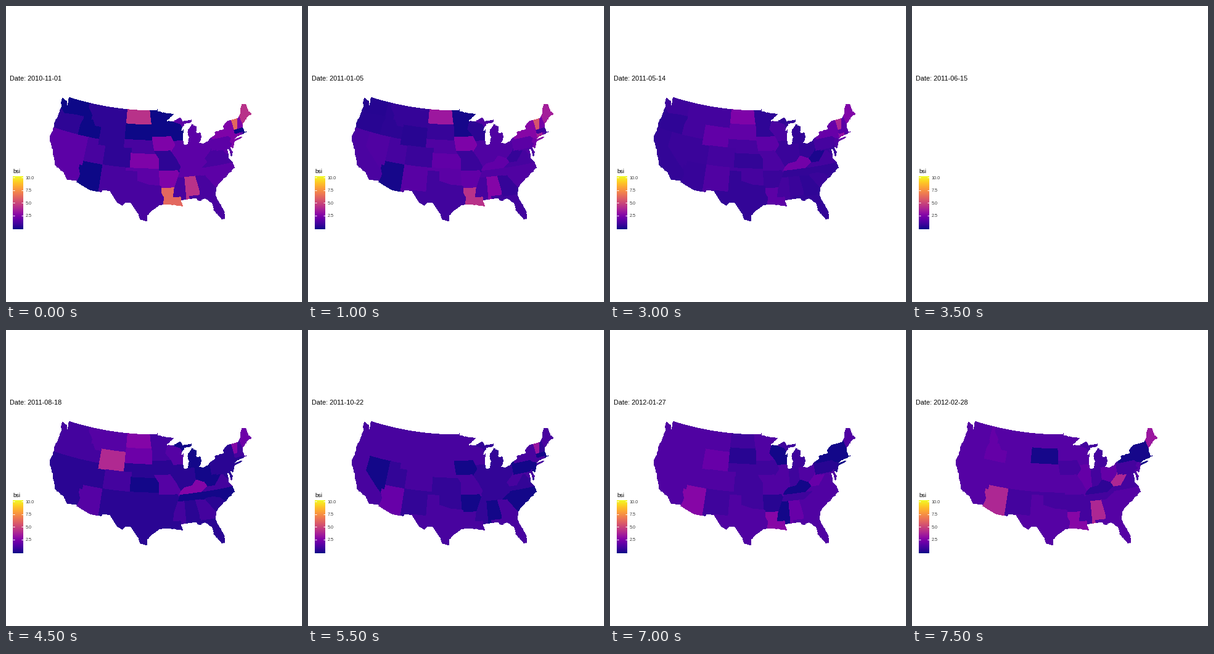
A matplotlib script for the animation above (8000 ms loop, 480 by 480 pixels).

```python
import random

import matplotlib.pyplot as plt
import numpy as np
from matplotlib.animation import FuncAnimation
from matplotlib.patches import PathPatch, Polygon
from matplotlib.path import Path

SIZE, DPI = 480, 72
FRAMES, INTERVAL = 16, 500
EMPTY = 7                                # step without data
START, SPAN = np.datetime64("2010-11-01"), 484
TOP = 10.3                               # value at the bright end of the scale

# Step: (common level, {other level: states}); steps between are blended.
LEVELS = {
    0: (1.7, {0: "WA ID AZ SD MN WI MA", .6: "OR MT WY CO MO",
              1.2: "UT NM NE TX MS GA FL VA WV", 2.6: "KS IA AR NJ NY CT NH",
              4.4: "ND AL ME", 6.3: "LA VT"}),
    4: (1.1, {.3: "OR WY AZ MN GA WV", .85: "WA CA MT TX FL",
              1.6: "SD OK NE PA", 2: "NM KY NJ MA NH RI", 2.5: "ND IA LA",
              3: "NY ME", 4.9: "VT CT"}),
    9: (.5, {.1: "MI OH WV NC TN KS", 1.1: "WA OR ID CO MN MS VA GA NH MA",
             1.5: "AZ MO MT WI", 2.1: "SD ME", 2.7: "ND KY VT", 4.1: "WY"}),
    11: (1.2, {.1: "NV IA AR AL SC NC NJ PA MA",
               .7: "UT NM KS OK IL MI IN OH KY TN MS VA NH",
               2: "AZ", 3.3: "VT"}),
    14: (1.4, {.1: "MS KY WI NY VT NH MA CT RI", .45: "SD AR PA NJ",
               1: "NM ND KS OK IA IN MI TN NE", 2: "WY AL WV", 2.8: "AZ LA"}),
    15: (1.5, {.15: "SD NY VT NH MA CT RI", .6: "KY",
               1.1: "NM OK IA AR IN MI TN MS MD VA PA", 1.9: "ID IL OH",
               2.8: "LA", 3.4: "ME", 4: "AZ AL WV"}),
}

plt.rcParams["font.family"] = "Liberation Sans"
plasma = plt.get_cmap("plasma")
rng = random.Random(5)

fig = plt.figure(figsize=(SIZE / DPI, SIZE / DPI), dpi=DPI, facecolor="white")
ax = fig.add_axes([0, 0, 1, 1])
ax.set_axis_off()

# ---- projection: Albers conic, parallels 39 and 45 ----
S1, S2 = np.sin(np.radians([39, 45]))
N = (S1 + S2) / 2
C = 1 - S1 ** 2 + 2 * N * S1
SCALE = 455.3


def rho(lat):
    return np.sqrt(C - 2 * N * np.sin(np.radians(lat))) / N


def project(pts):
    """Degrees west and north to stage pixels."""
    lon, lat = np.asarray(pts, float).T
    a, r = N * np.radians(95.84 - lon), rho(lat)
    return np.column_stack([240.6 + SCALE * r * np.sin(a),
                            168.8 + SCALE * (r * np.cos(a) - rho(49))])


def dense(pts):
    """Split long edges so that parallels come out curved."""
    out = []
    for (x0, y0), (x1, y1) in zip(pts, pts[1:]):
        n = int(np.hypot(x1 - x0, y1 - y0) / 0.8) + 1
        out += [(x0 + (x1 - x0) * i / n, y0 + (y1 - y0) * i / n) for i in range(n)]
    return out + [pts[-1]]


def rough(pts, levels=4, amount=0.17):
    """Midpoint displacement for ragged shores."""
    for _ in range(levels):
        out = []
        for (x0, y0), (x1, y1) in zip(pts, pts[1:]):
            dx, dy = x1 - x0, y1 - y0
            k = rng.uniform(-amount, amount) * min(1, 0.6 / np.hypot(dx, dy))
            out += [(x0, y0), ((x0 + x1) / 2 - k * dy, (y0 + y1) / 2 + k * dx)]
        pts = out + [pts[-1]]
    return pts


# ---- outline of the country, key points only ----
pacific = [
    (122.8, 49), (122.4, 47.3), (122.7, 48.1), (124.7, 48.4), (124, 46.3),
    (124.1, 44.3), (124.5, 42.9), (124.1, 41.5), (124.4, 40.4), (123.7, 38.9),
    (122.5, 37.7), (121.9, 36.5), (120.6, 34.6), (118.4, 33.8), (117.1, 32.5)]
south = [
    (117.1, 32.5), (114.7, 32.7), (114.8, 32.5), (111.1, 31.33), (108.2, 31.33),
    (108.2, 31.8), (106.5, 31.8), (104.5, 29.6), (103.2, 29), (102.5, 29.75),
    (101.4, 29.77), (99.5, 27.5), (99.1, 26.4), (97.15, 25.95)]
gulf = [
    (97.15, 25.95), (97.4, 27.3), (94.7, 29.4), (92.3, 29.55), (90.1, 29.1),
    (89.2, 29), (89.5, 30.2), (86.2, 30.4), (85.3, 29.7), (84.1, 30.1),
    (82.75, 29), (82.6, 27.5), (81.1, 25.2), (80.4, 25.2), (80.05, 26.8),
    (81.4, 30.5)]
atlantic = [
    (81.4, 30.5), (80.9, 32), (79.2, 33.2), (77.95, 33.9), (76.6, 34.7),
    (75.5, 35.25), (76, 36.9), (76.35, 37.3), (76.4, 39.2), (76.15, 39.2),
    (76, 37.15), (75.1, 38.5), (75.5, 39.5), (74.9, 39), (74, 40.3), (73.7, 41),
    (71.4, 41.45), (70, 41.65), (70.1, 42), (70.6, 41.9), (70.8, 42.8),
    (70.2, 43.6), (68.8, 44.4), (67, 44.8)]
northeast = [
    (67, 44.8), (67.8, 45.7), (67.8, 47.07), (68.3, 47.35), (69.2, 47.45),
    (70, 46.7), (70.4, 45.8), (71.5, 45), (74.7, 45)]
lakes = [
    (74.7, 45), (76.3, 44.2), (76.2, 43.55), (79.05, 43.27), (78.9, 42.85),
    (81.3, 41.75), (82.5, 41.4), (83.4, 41.75), (82.45, 43), (82.7, 44),
    (83.8, 43.7), (83.4, 45), (84.75, 45.78), (86.2, 44.7), (86.5, 44),
    (86.25, 43), (86.8, 41.8), (87.5, 41.7), (87.8, 43), (87.1, 45.2),
    (88, 44.6), (87, 45.75), (84.7, 45.95), (84.6, 46.5), (87.4, 46.5),
    (87.9, 47.4), (90.4, 46.6), (92.1, 46.75), (89.6, 48), (93, 48.6),
    (94.7, 48.75)]
north = [(94.7, 48.75), (94.8, 49.33), (95.15, 49.38), (95.15, 49), (122.8, 49)]

land = project(rough(pacific) + dense(south) + rough(gulf) + rough(atlantic)
               + dense(northeast) + rough(lakes) + dense(north))
x, y = land.T
if np.sum(x * np.roll(y, -1) - y * np.roll(x, -1)) > 0:
    land = land[::-1]

# White sheet with the country cut out; states are painted beneath it.
sheet = Path.make_compound_path(
    Path([(0, 0), (SIZE, 0), (SIZE, SIZE), (0, SIZE), (0, 0)], closed=True),
    Path(np.vstack([land, land[:1]]), closed=True))
ax.add_patch(PathPatch(sheet, fc="white", lw=0, aa=False, zorder=3))

# ---- states: rough cuts, each one covering the spill of those before ----
states = []


def values(name):
    """Level of one state at each step of LEVELS."""
    return [next((v for v, names in odd.items() if name in names.split()), common)
            for common, odd in LEVELS.values()]


def poly(name, *pts, z=2):
    patch = Polygon(project(dense([*pts, pts[0]])), lw=0, aa=False, zorder=z)
    ax.add_patch(patch)
    states.append((patch, values(name)))


def box(name, west, east, low, high):
    poly(name, (west, high), (east, high), (east, low), (west, low))


box("rest", 125, 67, 25, 49)

# west
box("MT", 116.5, 104.05, 44.5, 50)
box("OR", 125, 116.5, 42, 46.3)
poly("ID", (117.03, 50), (116.05, 50), (116.05, 48), (114.5, 46.6), (114.5, 45.6),
     (113.9, 45.6), (113, 44.5), (111, 44.5), (111, 42), (117.03, 42), (117.03, 44.2),
     (116.5, 45.6), (117.03, 46.4))
poly("WA", (125, 50), (117.03, 50), (117.03, 46), (119, 46), (122.5, 45.6),
     (123.4, 46.25), (125, 46.25))
box("NV", 120, 114.04, 35, 42)
box("UT", 114.04, 109.05, 37, 42)
box("WY", 111.05, 104.05, 41, 45)
poly("AZ", (114.04, 37), (109.05, 37), (109.05, 31), (116, 31), (114.7, 35),
     (114.75, 36.1), (114.04, 36.1))
poly("CA", (125, 42), (120, 42), (120, 39), (114.63, 35), (114.3, 34.2),
     (114.7, 32.7), (114.7, 32), (125, 32))

# plains
box("ND", 104.05, 96.6, 45.94, 50)
box("NE", 104.05, 95.3, 40, 43)
box("SD", 104.05, 96.4, 42.9, 45.94)
box("CO", 109.05, 102.05, 37, 41)
box("KS", 102.05, 94.6, 37, 40)
box("NM", 109.05, 103, 31, 37)
box("TX", 106.6, 93.7, 25, 32)
box("TX", 103, 93.7, 31, 36.5)
poly("OK", (103, 37), (94.6, 37), (94.5, 33.65), (97, 33.8), (100, 34.56),
     (100, 36.5), (103, 36.5))

# middle
box("WI", 92.8, 87, 42.5, 47.1)
box("IL", 91.5, 87.5, 37, 42.5)
box("IN", 87.53, 84.8, 37.8, 41.75)
box("OH", 84.8, 80.52, 38.4, 42)
box("MI", 87, 82.3, 41.74, 45.83)
poly("MI", (90.4, 46.6), (90, 48), (83.5, 47), (83.5, 45.83), (86.5, 45.5),
     (87.6, 45.1), (88.1, 45.9))
poly("MN", (97.3, 50), (89, 50), (89, 47.8), (92.1, 46.7), (92.8, 45), (91.2, 43.5),
     (96.45, 43.5), (96.45, 45.6), (96.8, 47))
poly("IA", (96.45, 43.5), (91.2, 43.5), (90.2, 41.8), (91.4, 40.5), (95.8, 40.6))
box("TN", 90.3, 81.7, 35, 36.55)
box("MS", 91.6, 88.3, 29.5, 35)
poly("MO", (95.8, 40.6), (91.6, 40.6), (90.1, 38.8), (89.1, 37), (89.7, 36),
     (90.1, 36.5), (94.62, 36.5), (94.6, 39.1))
poly("AR", (94.62, 36.5), (90.1, 36.5), (89.7, 36), (91.15, 33), (94.04, 33),
     (94.04, 33.55), (94.45, 33.6))
poly("LA", (94.04, 33), (91.15, 33), (91.6, 31), (89.73, 31), (89.6, 30.2),
     (88.5, 30), (88.5, 28), (93.85, 28), (93.55, 31.2), (94.04, 32))

# southeast
box("AL", 88.3, 85, 29.5, 35)
poly("GA", (85.6, 35), (83.2, 35), (80.9, 32), (80, 30.7), (85, 30.6), (85.05, 32.3))
box("FL", 87.55, 79, 24, 30.65)
box("FL", 87.55, 85, 30, 31)
poly("NC", (84.3, 35), (81.7, 36.55), (75, 36.55), (75, 33), (83.2, 35))
poly("SC", (83.2, 35), (82.3, 35.2), (81, 35.1), (79.7, 34.8), (78.5, 33.85),
     (80, 31.5), (80.9, 32))
poly("KY", (89.5, 36.5), (83.7, 36.6), (82, 37.5), (82.6, 38.3), (84.8, 39.1),
     (86, 38), (88, 37.8), (89.1, 37))

# northeast
box("MD", 79.48, 75, 38, 39.72)
poly("VA", (83.7, 36.57), (75, 36.55), (75, 38), (77, 38.3), (77.7, 39.3),
     (78.35, 39.4), (80.3, 37.5), (82, 37.5))
poly("WV", (82.6, 38.3), (82, 37.5), (80.3, 37.5), (78.35, 39.4), (79.48, 39.3),
     (79.48, 39.72), (80.52, 39.72), (80.52, 40.6), (80.8, 39.7))
box("PA", 80.52, 74.8, 39.72, 42.3)
box("DE", 75.79, 75, 38.45, 39.85)
box("NY", 79.76, 73.3, 42, 45.2)
poly("NY", (75.35, 42), (74.7, 41.35), (74, 41), (74, 40.5), (73.6, 40.5), (73.5, 42.05))
poly("NY", (74, 40.6), (73.7, 40.9), (72.6, 41), (71.9, 41.05), (72.5, 40.8), z=4)
poly("NJ", (75.5, 39.6), (74.75, 40.2), (75.2, 40.7), (74.7, 41.35), (73.9, 41),
     (73.8, 39), (74.9, 38.7))
box("ME", 71.1, 66, 42.9, 48)
poly("VT", (73.4, 45.1), (71.5, 45.1), (72.5, 42.7), (73.27, 42.7))
poly("NH", (71.5, 45.1), (71.1, 45.4), (70.7, 42.8), (72.5, 42.7))
box("CT", 73.5, 71.85, 40.9, 42.04)
box("RI", 71.85, 71.1, 41.2, 42.04)
box("MA", 73.4, 69, 42.04, 42.75)
box("MA", 71.15, 69, 41, 42.1)

# ---- legend ----
ramp = np.linspace(1, 0, 86)[:, None]
ax.imshow(ramp, cmap=plasma, extent=(11, 28, 362, 276), aspect="auto", zorder=5)
ax.text(11, 271, "bsi", size=9.3, zorder=6)
for value in (2.5, 5, 7.5, 10):
    ty = 360.2 - 8.2 * value
    ax.text(31.7, ty + 2.6, f"{value:.1f}", size=7.3, color="#383838", zorder=6)
    for x0 in (11, 24.6):
        ax.plot([x0, x0 + 3.4], [ty, ty], color="white", lw=1, zorder=6,
                solid_capstyle="butt")
date = ax.text(6, 121, "", size=10.85, zorder=6)
ax.set_xlim(0, SIZE)
ax.set_ylim(SIZE, 0)


def draw(k):
    date.set_text(f"Date: {START + round(k * SPAN / (FRAMES - 1))}")
    for patch, levels in states:
        patch.set_visible(k != EMPTY)
        patch.set_facecolor(plasma(float(np.interp(k, list(LEVELS), levels)) / TOP))
    return [date] + [patch for patch, _ in states]


anim = FuncAnimation(fig, draw, frames=FRAMES, interval=INTERVAL, repeat=True,
                     repeat_delay=0, blit=False)
plt.show()
```
